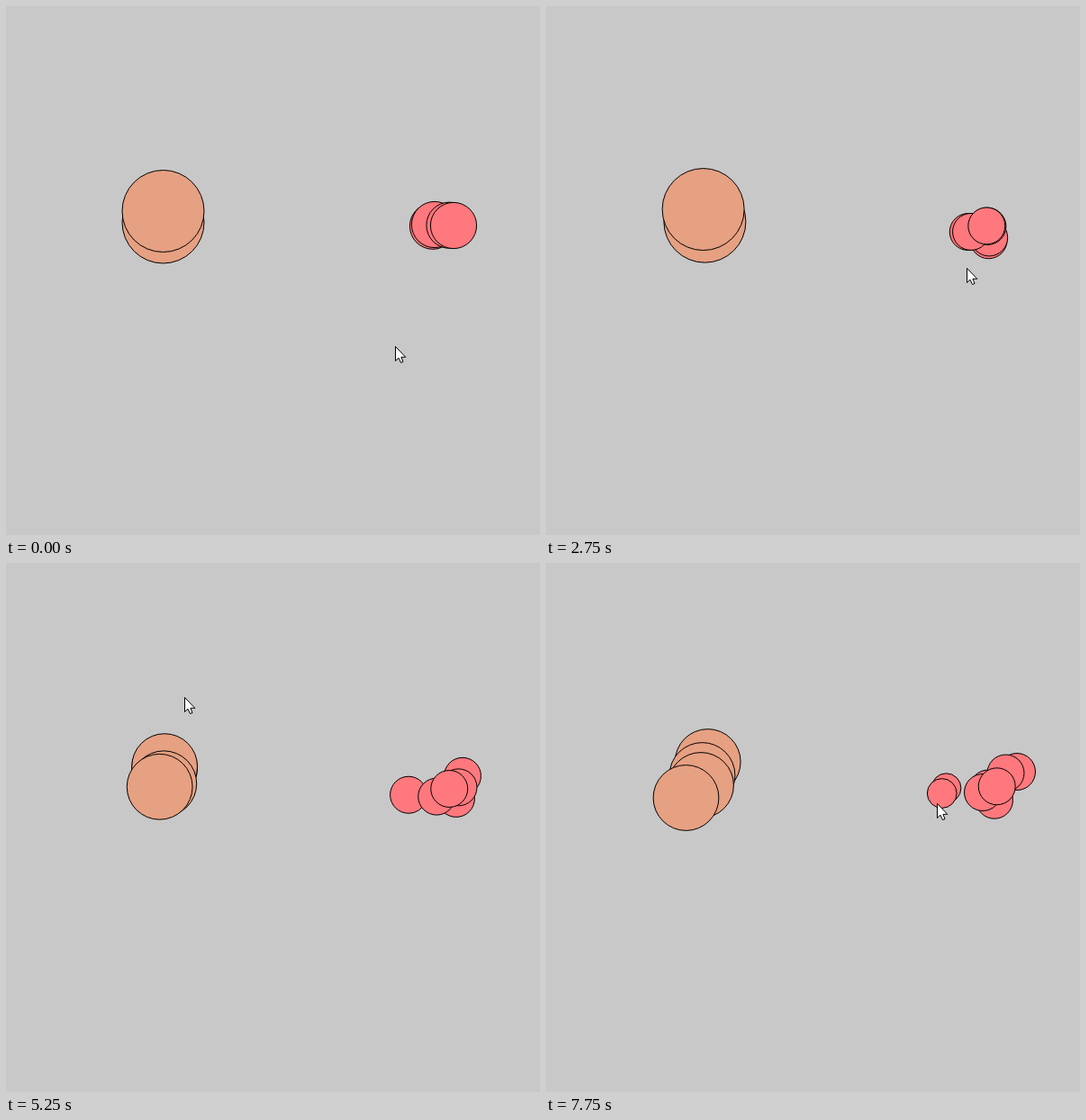
Recreate the animation shown at these times as an HTML page with a canvas. Size 593 px wide and 588 px high, loop 8000 ms.

```html
<!DOCTYPE html>
<html>
<head>
<meta charset="utf-8">
<style>
  html, body { margin: 0; overflow: hidden; background: #c8c8c8; }
  canvas { display: block; }
</style>
</head>
<body>
<canvas id="stage" width="593" height="588"></canvas>
<script>
const ctx = document.getElementById('stage').getContext('2d');
const LOOP = 8000, STEP = 250;
const ORANGE = { color: '#e6a082', radius: 45.5 };
const RED = { color: '#ff787d', radius: 25.6 };

// Places where circles split: the end of one path starts two others.
const low = [177, 238.5], high = [176, 224.7];
const west = [471, 250], south = [491, 260], east = [489, 244], far = [440, 253];

// Every split shrinks the circles; stops on a path are evenly spaced in time.
const generations = [
  { kind: ORANGE, splits: 0, from: 0, to: 4250, paths: [
    [[174.5, 240.5], low],
    [[174.5, 228], high]] },
  { kind: ORANGE, splits: 1, from: 4250, to: LOOP, paths: [
    [high, [178, 229], [179.7, 221]],
    [high, [176, 229], [173.5, 236]],
    [low, [172, 250], [172, 247]],
    [low, [165, 255], [155.5, 261]]] },
  { kind: RED, splits: 0, from: 0, to: 2500, paths: [
    [[474, 244.7], east],
    [[476, 243], west],
    [[492.5, 243.7], south],
    [[497, 244], east]] },
  { kind: RED, splits: 1, from: 2500, to: 7500, paths: [
    [west, [449, 258], far]] },
  { kind: RED, splits: 1, from: 2500, to: LOOP, paths: [
    [east, [497, 249], [491, 250.5]],
    [south, [500, 262], [498, 263.7]],
    [south, [506, 237], [523, 232]],
    [east, [502, 250], [510.5, 233.5]],
    [west, [478, 260], [485, 255]],
    [east, [492, 251], [500.7, 248.3]]] },
  { kind: RED, splits: 2, from: 7500, to: LOOP, paths: [
    [far, [444.5, 250.2]],
    [far, [439.7, 256]]] }
];

// time, x, y
const pointerStops = [
  [0, 432, 378], [1250, 465, 363], [2250, 463, 263], [3500, 473, 333],
  [4250, 182, 232], [5250, 198, 149], [6250, 354, 215], [7750, 434, 267]
];
const arrow = new Path2D('M.5 .5V16.5L4 13.2L6.5 18.5L9 17.5L6.9 12.3H11.8Z');

const mix = (a, b, u) => a.map((v, i) => v + (b[i] - v) * u);

// Straight legs between stops, with a small wander that fades out at each stop.
function along(path, u, seed) {
  const legs = path.length - 1;
  const leg = Math.min(legs - 1, Math.floor(u * legs));
  const v = u * legs - leg;
  const wander = 1.2 * Math.sin(Math.PI * v);
  const [x, y] = mix(path[leg], path[leg + 1], v);
  return [x + wander * Math.sin(seed), y + wander * Math.cos(seed * 1.7)];
}

function pointerAt(t) {
  const i = Math.max(1, pointerStops.findIndex(stop => stop[0] >= t));
  const a = pointerStops[i - 1], b = pointerStops[i];
  return mix(a, b, (t - a[0]) / (b[0] - a[0])).slice(1).map(Math.round);
}

function drawCircle(x, y, r) {
  ctx.beginPath();
  ctx.arc(x, y, r, 0, 2 * Math.PI);
  ctx.fill();
  ctx.stroke();
}

function draw(now) {
  const t = Math.floor(now % LOOP / STEP) * STEP;
  ctx.fillStyle = '#c8c8c8';
  ctx.fillRect(0, 0, 593, 588);
  for (const { kind, splits, from, to, paths } of generations) {
    if (t < from || t >= to) continue;
    const u = (t - from) / (to - STEP - from);
    ctx.fillStyle = kind.color;
    paths.forEach((path, i) => {
      const [x, y] = along(path, u, t / STEP * 2.3 + i * 5);
      drawCircle(x, y, kind.radius * 0.8 ** splits);
    });
  }
  ctx.save();
  ctx.translate(...pointerAt(t));
  ctx.fillStyle = '#fff';
  ctx.fill(arrow);
  ctx.stroke(arrow);
  ctx.restore();
}

const start = performance.now();
function frame() {
  draw(performance.now() - start);
  requestAnimationFrame(frame);
}
frame();
</script>
</body>
</html>
```
